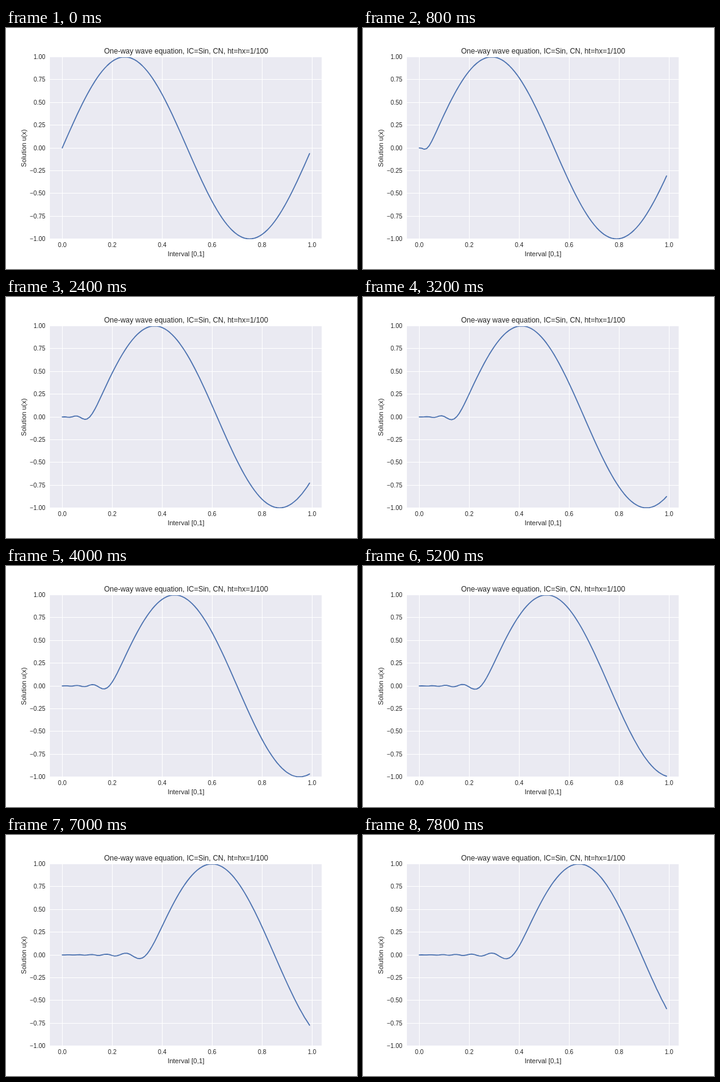
An HTML page that plays this animation: 576 px wide and 396 px high, repeating every 8000 ms.

```html
<!DOCTYPE html>
<html lang="en">
<head>
<meta charset="utf-8">
<title>One-way wave equation</title>
<style>
  html, body { margin: 0; width: 100%; height: 100%; overflow: hidden; background: #fff; }
  svg { display: block; width: 576px; height: 396px; }
  text { font-family: "Liberation Sans", Arial, sans-serif; font-size: 10px; fill: #262626; }
  .mid { text-anchor: middle; }
  .end { text-anchor: end; }
  .label { font-size: 11px; }
  .title { font-size: 12px; }
  #grid { stroke: #fff; stroke-width: 1; }
  #curve { fill: none; stroke: #4c72b0; stroke-width: 1.75; stroke-linejoin: round; stroke-linecap: round; }
</style>
</head>
<body>
<svg viewBox="0 0 576 396">
  <clipPath id="plot"><rect x="72" y="48" width="446" height="299"/></clipPath>
  <rect x="72" y="48" width="446" height="299" fill="#eaeaf2"/>
  <g clip-path="url(#plot)">
    <path id="grid"/>
    <path id="curve"/>
  </g>
  <g id="ticks"></g>
  <text class="mid title" x="295.6" y="42">One-way wave equation, IC=Sin, CN, ht=hx=1/100</text>
  <text class="mid label" x="295.4" y="375">Interval [0,1]</text>
  <text class="mid label" transform="translate(33 197.5) rotate(-90)">Solution u(x)</text>
</svg>
<script>
const CELLS = 100, STEPS = 40, STEP_MS = 200;
const h = 1 / CELLS;
const px = x => 72 + (x + 0.0495) * 446.4 / 1.089;
const py = u => 197.01 - u * 149.49;
const wave = x => Math.sin(2 * Math.PI * x);

// One Crank-Nicolson step of u_t + u_x = 0 with central differences,
// solved with the Thomas algorithm; u(0) = 0 and u(1) is the exact wave.
function advance(u, time) {
  const next = new Array(CELLS + 1).fill(0);
  const c = [0], d = [0];
  next[CELLS] = wave(1 - time);
  for (let j = 1; j < CELLS; j++) {
    const rhs = u[j] - (u[j + 1] - u[j - 1]) / 4;
    const pivot = 1 + c[j - 1] / 4;
    c[j] = 0.25 / pivot;
    d[j] = (rhs + d[j - 1] / 4) / pivot;
  }
  for (let j = CELLS - 1; j > 0; j--) next[j] = d[j] - c[j] * next[j + 1];
  return next;
}

const toPath = u => "M" + u.slice(0, CELLS)
  .map((v, j) => px(j * h).toFixed(2) + " " + py(v).toFixed(2)).join("L");

const paths = [];
let u = Array.from({ length: CELLS + 1 }, (_, j) => wave(j * h));
for (let n = 0; n < STEPS; n++) {
  paths.push(toPath(u));
  u = advance(u, (n + 1) * h);
}

const ticks = document.getElementById("ticks");
function addTick(text, x, y, anchor) {
  const el = document.createElementNS("http://www.w3.org/2000/svg", "text");
  el.setAttribute("class", anchor);
  el.setAttribute("x", x);
  el.setAttribute("y", y);
  el.textContent = text;
  ticks.append(el);
}

const snap = v => Math.floor(v) + 0.5;
let grid = "";
for (let i = 0; i <= 5; i++) {
  const x = px(i / 5);
  grid += `M${snap(x)} 48V347`;
  addTick((i / 5).toFixed(1), x, 360, "mid");
}
for (let i = -4; i <= 4; i++) {
  const y = py(i / 4);
  grid += `M72 ${snap(y)}H518`;
  addTick((i / 4).toFixed(2).replace("-", "\u2212"), 64.6, Math.round(y + 3.6), "end");
}
document.getElementById("grid").setAttribute("d", grid);

const curve = document.getElementById("curve");
let shown = -1;
function draw() {
  const n = Math.floor(performance.now() / STEP_MS) % STEPS;
  if (n !== shown) curve.setAttribute("d", paths[shown = n]);
  requestAnimationFrame(draw);
}
draw();
</script>
</body>
</html>
```
